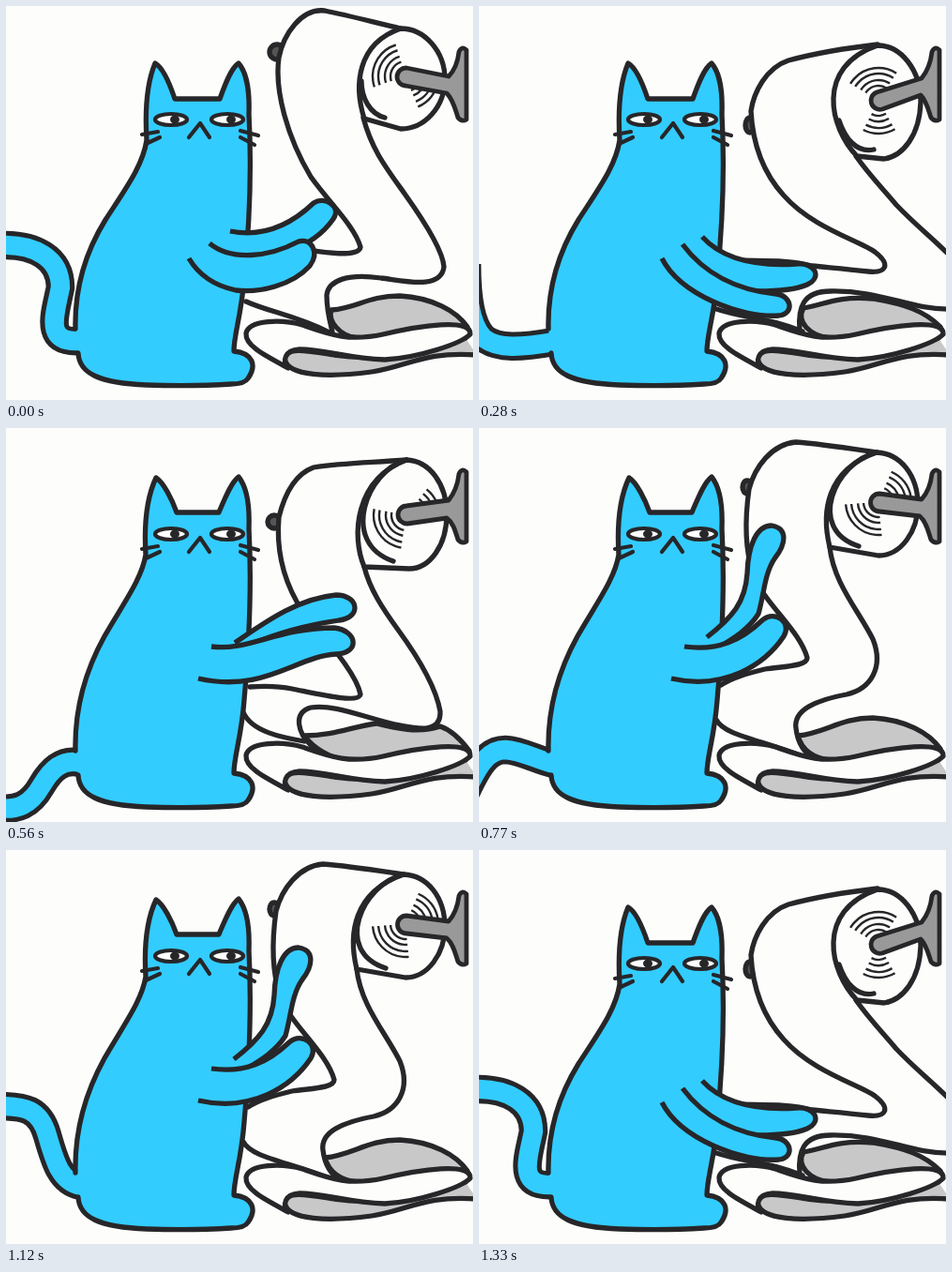
An HTML page for the animation above (1400 ms loop, 498 by 420 pixels).

```html
<!DOCTYPE html>
<html lang="en">
<head>
<meta charset="utf-8">
<title>Cat unrolling paper</title>
<style>
  html, body { margin: 0; width: 100%; height: 100%; overflow: hidden; background: #fdfefc; }
  svg { display: block; width: 498px; height: 420px; }
  path, ellipse, circle { stroke: #272629; stroke-width: 5.3; stroke-linecap: round; stroke-linejoin: round; fill: none; }
  .cat { fill: #33ccff; }
  .paper { fill: #fdfefc; }
  .shade { fill: #c8c8c8; }
  .metal { fill: #999; stroke-width: 4.8; }
  .knob { fill: #555; }
  .arm { stroke-linecap: butt; }
  .thin > * { stroke-width: 4.2; }
  .thin .pupil { fill: #272629; stroke-width: 3; }
  .rings circle { stroke-width: 2.4; stroke-linecap: butt; stroke-dasharray: 0 5 16 26 25.5 27.5; }

  .pose { opacity: 0; animation: show 350ms steps(1) infinite; animation-delay: calc((var(--i) - 5) * 70ms); }
  @keyframes show { 0% { opacity: 1; } 20%, 100% { opacity: 0; } }

  .tail { stroke-width: 30.5; stroke-linecap: butt; animation: wag 1400ms infinite; }
  .tail + .tail { stroke: #33ccff; stroke-width: 20.3; }
  @keyframes wag {
    0%   { d: path("M80 357C40 360 52 330 58 300C58 268 30 254 -6 255"); animation-timing-function: steps(4); }
    20%  { d: path("M80 358C45 364 20 366 5 354C-9 340 -13 310 -13 275"); animation-timing-function: steps(4); }
    40%  { d: path("M80 357C60 352 48 364 38 381C26 402 12 408 -10 405"); animation-timing-function: steps(3); }
    55%  { d: path("M80 358C62 354 46 344 28 343C10 343 0 358 -14 388"); animation-timing-function: steps(2); }
    65%  { d: path("M80 357C58 352 50 332 36 325C25 318 10 317 -10 317"); animation-timing-function: steps(3); }
    80%  { d: path("M80 358C58 354 52 332 44 304C36 276 20 273 -8 273"); animation-timing-function: steps(3); }
    95%, 100% { d: path("M80 357C40 360 52 330 58 300C58 268 30 254 -6 255"); animation-timing-function: steps(1); }
  }
</style>
</head>
<body>
<svg viewBox="0 0 498 420">
  <defs>
    <g id="rings" class="rings">
      <circle r="16" pathLength="100"/><circle r="22" pathLength="100"/>
      <circle r="29" pathLength="100"/><circle r="35" pathLength="100"/>
    </g>

    <g id="pile">
      <path class="shade" d="M502 372C445 368 430 384 390 390C345 396 300 395 297 376C297 362 325 368 350 372C410 380 460 364 490 354"/>
      <path class="paper" d="M301 386C275 372 255 362 256 349C259 334 295 334 316 340C345 350 365 358 402 350C440 341 497 332 495 350C485 360 440 375 404 377C365 376 340 366 313 366C296 367 295 379 301 386Z"/>
    </g>

    <g id="face" class="thin">
      <ellipse class="paper" cx="176" cy="121" rx="17" ry="6"/>
      <ellipse class="paper" cx="236" cy="121" rx="17" ry="6"/>
      <ellipse class="pupil" cx="180" cy="121" rx="3.5" ry="3"/>
      <ellipse class="pupil" cx="240" cy="121" rx="3.5" ry="3"/>
      <path d="M195 140L207 125L217 140"/>
      <path d="M145 137L162 134M149 147L164 140M250 133L269 138M250 140L265 148"/>
    </g>

    <g id="low">
      <path class="cat" d="M74 344C73 300 85 262 106 228C128 194 146 170 150 143C148 110 151 80 159 61C168 66 175 84 180 99H228C233 85 240 66 248 61C256 70 260 90 259 115C262 170 260 230 254 290C251 330 243 350 243 368C263 370 268 383 258 397C255 402 248 403 240 403C210 405 180 405 150 404C100 402 78 392 77 370"/>
      <use href="#face"/>
    </g>
    <g id="high">
      <path class="cat" d="M74 344C73 300 84 260 105 222C127 184 145 160 149 135C147 102 151 72 160 53C168 58 177 76 182 90H227C233 76 240 58 248 52C256 62 260 82 259 107C262 162 260 222 254 290C251 330 243 350 243 368C263 370 268 383 258 397C255 402 248 403 240 403C210 405 180 405 150 404C100 402 78 392 77 370"/>
      <use href="#face" y="-8"/>
    </g>
  </defs>

  <path class="tail"/><path class="tail"/>

  <!-- reaching -->
  <g class="pose" style="--i:0">
    <circle class="knob" cx="289" cy="49" r="8"/>
    <path class="paper" d="M421 24C395 18 365 10 340 5C315 2 296 30 291 55C286 90 300 140 325 182C345 210 372 235 378 257C376 268 345 263 328 261"/>
    <path d="M381 119C390 153 405 172 425 200C450 235 466 262 467 278C464 303 425 293 400 290C365 285 344 292 342 308C342 325 345 335 348 347"/>
    <path d="M256 315C280 326 310 330 345 348"/>
    <path class="shade" d="M347 324C375 322 385 309 420 309C455 311 480 325 492 342C450 340 410 352 375 354C355 352 343 335 347 324Z"/>
    <use href="#pile"/>
    <path class="paper" d="M421 24C446 24 468 48 468 78C468 108 446 131 421 131L382 120C371 85 374 40 421 24Z"/>
    <path d="M379 80C379 98 388 115 404 119"/>
    <use href="#rings" transform="translate(426 75) rotate(-8)"/>
    <path class="metal" d="M472 75L427 66A9.5 9.5 0 0 0 426 85L470 93C477 100 479 110 482 119Q486 124 491 121V47Q486 42 483 49Q481 66 472 75Z"/>
    <use href="#low"/>
    <path class="cat arm" d="M239 240C275 247 305 232 328 210C340 202 358 214 349 227C338 243 320 255 300 262C275 275 250 275 232 270"/>
    <path class="cat arm" d="M217 253C240 272 280 268 312 251C325 247 335 262 324 277C305 298 270 306 245 303C222 298 205 286 195 269"/>
  </g>

  <!-- paw up -->
  <g class="pose" style="--i:1">
    <ellipse class="knob" cx="286" cy="63" rx="5" ry="7"/>
    <path class="paper" d="M424 26C390 21 365 17 338 15C312 17 294 42 288 65C283 100 284 130 292 155C302 185 342 215 350 245C350 254 325 254 305 257C285 262 270 266 258 274"/>
    <path d="M374 127C378 165 405 195 420 225C432 255 418 278 392 284C360 290 335 300 338 320C340 338 348 346 356 352"/>
    <path d="M253 311C262 328 300 332 345 350"/>
    <path class="shade" d="M340 328C370 325 385 309 420 309C455 311 480 325 492 342C450 340 410 352 375 354C355 352 344 342 340 328Z"/>
    <use href="#pile"/>
    <path class="paper" d="M424 26C449 27 468 50 468 82C468 110 450 136 426 136L374 127C365 90 370 45 424 26Z"/>
    <path d="M424 26C380 36 348 108 405 126"/>
    <use href="#rings" transform="translate(426 79) rotate(-85)"/>
    <path class="metal" d="M472 76L427 70A9.5 9.5 0 0 0 427 89L470 94C477 100 479 110 482 119Q486 124 491 121V47Q486 42 483 49Q481 66 472 76Z"/>
    <use href="#high"/>
    <path class="cat arm" d="M243 223C270 202 284 186 286 155C287 125 296 104 312 104C330 107 327 124 316 138C304 155 304 178 298 198C288 214 272 224 255 234"/>
    <path class="cat arm" d="M219 233C255 238 280 226 302 205C316 193 334 208 325 222C305 252 262 280 205 267"/>
  </g>

  <!-- pulling -->
  <g class="pose" style="--i:2">
    <circle class="knob" cx="285" cy="81" r="7"/>
    <path class="paper" d="M425 30C390 29 362 27 333 28C308 34 295 58 290 80C285 115 290 145 302 172C315 195 358 234 364 262C364 274 330 268 300 268C285 268 275 271 260 275"/>
    <path d="M378 138C384 172 404 198 424 228C444 262 448 274 441 287C420 306 390 296 360 292C332 293 322 306 326 322C330 338 345 347 357 354"/>
    <path d="M253 308C262 326 298 332 330 340"/>
    <path class="shade" d="M329 328C360 325 380 311 420 311C458 313 478 323 493 343C450 341 410 352 372 356C352 352 338 342 329 328Z"/>
    <use href="#pile"/>
    <path class="paper" d="M425 30C451 31 470 55 470 87C470 118 451 143 428 143L378 138C367 102 371 50 425 30Z"/>
    <path d="M425 30C382 40 352 115 409 134"/>
    <use href="#rings" transform="translate(427 86) rotate(-78)"/>
    <path class="metal" d="M472 77L427 76A9.5 9.5 0 0 0 427 95L470 94C477 100 479 110 482 119Q486 124 491 121V47Q486 42 483 49Q481 66 472 77Z"/>
    <use href="#high"/>
    <path class="cat arm" d="M243 225C275 200 292 182 312 160C322 142 336 134 347 143C358 153 345 170 332 178C312 190 295 215 258 232"/>
    <path class="cat arm" d="M219 233C256 238 285 220 325 208C345 203 356 222 342 233C312 248 268 282 205 267"/>
  </g>

  <!-- halfway down -->
  <g class="pose" style="--i:3">
    <circle class="knob" cx="286" cy="100" r="7"/>
    <path class="paper" d="M427 34C390 37 360 37 328 42C306 50 296 75 291 95C288 130 296 160 310 185C325 210 372 255 378 284C376 294 335 284 305 278C290 275 275 275 260 276"/>
    <path d="M382 148C388 172 402 193 418 215C448 256 460 285 463 302C464 326 440 321 415 316C380 308 350 294 325 298C305 304 312 326 325 338C335 347 350 352 365 357"/>
    <path d="M253 303C262 324 295 330 318 334"/>
    <path class="shade" d="M318 328C350 328 370 318 395 315C415 320 440 326 463 318C475 322 485 332 494 344C450 341 410 352 368 357C348 352 330 344 318 328Z"/>
    <use href="#pile"/>
    <path class="paper" d="M427 34C452 35 470 60 470 92C470 125 452 150 430 150L382 148C368 115 372 55 427 34Z"/>
    <path d="M427 34C385 45 355 122 413 142"/>
    <use href="#rings" transform="translate(427 93) rotate(-70)"/>
    <path class="metal" d="M472 77L427 83A9.5 9.5 0 0 0 428 102L470 96C477 101 479 110 482 119Q486 124 491 121V47Q486 42 483 49Q481 66 472 77Z"/>
    <use href="#high"/>
    <path class="cat arm" d="M244 229C275 208 310 182 352 178C376 178 380 202 355 205C320 210 290 218 260 231"/>
    <path class="cat arm" d="M219 233C258 238 290 213 350 213C375 216 378 240 352 241C310 243 275 283 205 267"/>
  </g>

  <!-- paws down -->
  <g class="pose" style="--i:4">
    <ellipse class="knob" cx="289" cy="127" rx="5" ry="8"/>
    <path class="paper" d="M425 41C390 45 360 50 330 58C306 66 293 92 290 112C292 150 305 180 325 202C355 236 405 250 422 262C440 276 434 285 415 283C390 280 375 279 355 277C330 270 300 272 275 271"/>
    <path d="M402 160C416 180 430 194 445 212C465 233 482 246 502 266"/>
    <path d="M502 323C460 324 430 303 375 304C345 304 340 322 342 345M250 322C285 334 310 332 345 347"/>
    <path class="shade" d="M346 322C370 318 380 309 420 312C455 318 475 325 492 342C450 340 410 352 375 354C352 352 338 336 346 322Z"/>
    <use href="#pile"/>
    <path class="paper" d="M425 42C450 42 471 68 471 102C470 138 452 160 432 163L403 160C374 130 358 65 425 42Z"/>
    <path d="M384 122C390 140 402 157 421 153"/>
    <use href="#rings" transform="translate(426 101) rotate(42)"/>
    <path class="metal" d="M472 77L424 92A9.5 9.5 0 0 0 430 110L471 95C477 101 479 110 482 119Q486 124 491 121V47Q486 42 483 49Q481 66 472 77Z"/>
    <use href="#low"/>
    <path class="cat arm" d="M238 246C258 268 290 278 338 275C358 273 367 289 350 297C336 303 315 304 298 304L298 310C275 306 245 292 230 274"/>
    <path class="cat arm" d="M217 254C240 285 275 303 317 307C332 308 338 327 320 330C280 333 215 308 195 269"/>
  </g>
</svg>
</body>
</html>
```
